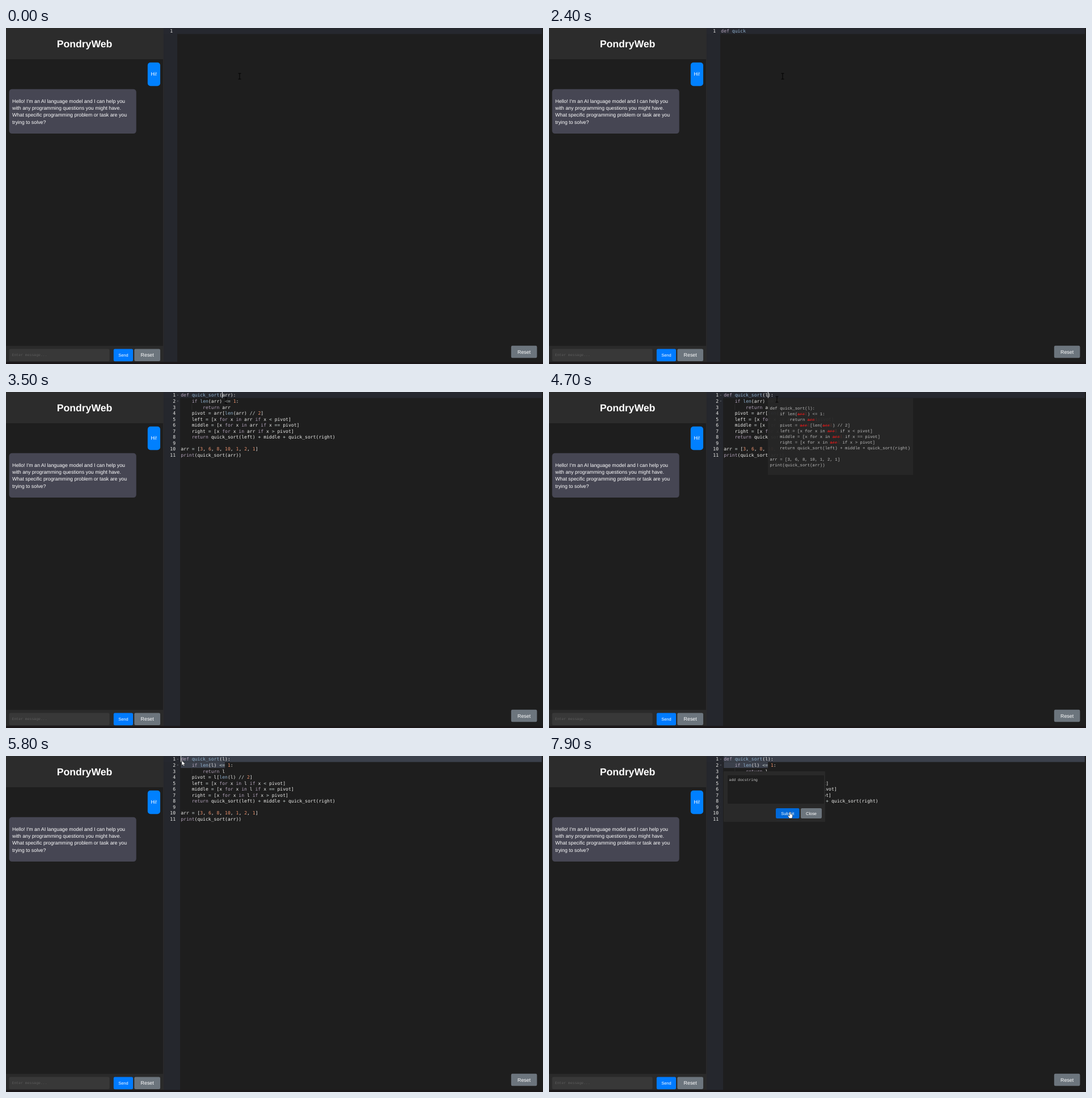
Recreate the animation shown at these times as an HTML page. Size 947 by 592 pixels, loop 8000 ms.

```html
<!DOCTYPE html>
<html lang="en">
<head>
<meta charset="utf-8">
<title>PondryWeb</title>
<style>
  html, body { margin: 0; width: 100%; height: 100%; overflow: hidden; background: #1e1e1e; }
  svg { display: block; width: 100%; height: 100%; }
  text { white-space: pre; text-rendering: geometricPrecision; fill: #fff; }
  .ui { font-family: "Liberation Sans", Arial, sans-serif; }
  .code { font: 8.09px "DejaVu Sans Mono", monospace; fill: #ececea; }
  .hint { font: 7.37px "Liberation Mono", monospace; fill: #bcbcbc; }
  .field { font: 6.47px "Liberation Mono", monospace; }
  .key { fill: #b3a3bb; }
  .fn { fill: #8fb0cc; }
  .num { fill: #e8906c; }
  .op { fill: #cbd6d4; }
  .del { fill: #d81a1a; text-decoration: line-through; }
  .ins { fill: #5c332e; }
</style>
</head>
<body>
<svg viewBox="0 0 947 592" preserveAspectRatio="none">
  <rect width="947" height="592" fill="#1e1e1e"/>
  <g id="editor"></g>
  <g id="chrome"></g>
  <g id="overlay"></g>
</svg>
<script>
const LOOP = 8000, STEP = 100;
const ROW = 10.55, CHAR = 4.87;
const $ = id => document.getElementById(id);

const rect = (x, y, w, h, fill, r = 0, more = '') =>
  `<rect x="${x}" y="${y}" width="${w}" height="${h}" rx="${r}" fill="${fill}" ${more}/>`;
const text = (x, y, body, cls, more = '') =>
  `<text x="${x}" y="${y}" class="${cls}" ${more}>${body}</text>`;
const esc = s => s.replace(/&/g, '&amp;').replace(/</g, '&lt;').replace(/>/g, '&gt;');
const span = (cls, s) => `<tspan class="${cls}">${esc(s)}</tspan>`;
const button = (x, y, w, h, fill, label, size) =>
  rect(x, y, w, h, fill, 2.2) +
  text(x + w / 2, y + h / 2 + size * 0.35, label, 'ui', `font-size="${size}" text-anchor="middle"`);

// Sorting program; v is the parameter's name, head the one in the signature
const program = (v, head = v) => [
  `def quick_sort(${head}):`,
  `    if len(${v}) <= 1:`,
  `        return ${v}`,
  `    pivot = ${v}[len(${v}) // 2]`,
  `    left = [x for x in ${v} if x < pivot]`,
  `    middle = [x for x in ${v} if x == pivot]`,
  `    right = [x for x in ${v} if x > pivot]`,
  '    return quick_sort(left) + middle + quick_sort(right)',
  '',
  'arr = [3, 6, 8, 10, 1, 2, 1]',
  'print(quick_sort(arr))'
];

const TOKENS = /((?<=def )\w+|\blen\b)|\b(def|if|return|for|in|print)\b|\b(\d+)\b|([<>=+\/]+)/g;
const paint = line => line.replace(TOKENS, (m, fn, key, num) =>
  span(fn ? 'fn' : key ? 'key' : num ? 'num' : 'op', m));

function drawChrome() {
  const says = [
    "Hello! I'm an AI language model and I can help you",
    'with any programming questions you might have.',
    'What specific programming problem or task are you',
    'trying to solve?'
  ];
  $('chrome').innerHTML =
    rect(0, 0, 277, 55, '#2c2c2c') +
    text(138.5, 33.5, 'PondryWeb', 'ui', 'font-size="17.65" font-weight="700" text-anchor="middle"') +
    rect(249.8, 60.7, 22.2, 41.5, '#0080ff', 5) +
    text(255.5, 84.4, 'Hi!', 'ui', 'font-size="8.84"') +
    rect(5.5, 107.8, 224.2, 78.3, '#464653', 5) +
    says.map((s, i) => text(11, 131.5 + i * 12.45, s, 'ui', 'font-size="8.84"')).join('') +
    rect(0, 560, 277, 28.5, '#2a2a2a') +
    rect(5.5, 565.5, 177, 21.5, '#383838', 2.5) +
    text(10.5, 578, 'Enter message...', 'field', 'style="fill:#5c5c5c"') +
    button(189.8, 565.5, 34.2, 21.7, '#007bff', 'Send', 7.4) +
    button(226.3, 565.5, 45.7, 21.5, '#6c757d', 'Reset', 8.84) +
    button(890.8, 559.8, 45.6, 21.4, '#6c757d', 'Reset', 8.84) +
    rect(277, 0, 1.5, 588.5, '#2b2b2e') +
    rect(0, 588.5, 947, 3.5, '#1b1719');
}

// Count of key presses made by time t
const pressed = (times, t) => times.filter(k => k <= t).length;
const NAME_KEYS = [400, 500, 600, 900, 1100, 1300, 1500, 1700, 1900];
const NOTE_KEYS = [6200, 6300, 6400, 6500, 6600, 6700, 6800, 7000, 7100, 7200, 7300, 7400, 7400];

// Pointer path: time, x, y
const PATH = [
  [3000, 412, 85], [3400, 388, 15], [3500, 388, 15], [3800, 402, 13],
  [5000, 402, 13], [5200, 386, 17], [5300, 336, 17], [5500, 310, 8],
  [5800, 310, 8], [6000, 325, 9], [7500, 325, 9], [7900, 425, 98]
];
function pointerAt(t) {
  const i = PATH.findIndex(p => p[0] > t);
  if (i === 0) return PATH[0].slice(1);
  if (i < 0) return PATH[PATH.length - 1].slice(1);
  const [a, b] = [PATH[i - 1], PATH[i]];
  const u = (t - a[0]) / (b[0] - a[0]), e = u * u * (3 - 2 * u);
  return [a[1] + (b[1] - a[1]) * e, a[2] + (b[2] - a[2]) * e];
}

// Everything the editor shows at time t; caret is [row, column]
function stateAt(t) {
  if (t < 3000) {
    const n = pressed(NAME_KEYS, t);
    return { lines: ['def quick'.slice(0, n)], caret: t >= 100 && t < 2200 ? [0, n] : null, row: 0 };
  }
  if (t < 3400) return { lines: program('arr'), caret: [10, 22], row: 10 };
  if (t < 4000) {
    const end = 15 + Math.max(0, Math.min(3, (t - 3500) / 100));
    return { lines: program('arr'), caret: [0, end], row: 0, sel: [[0, 15, end]] };
  }
  if (t < 5000) return { lines: program('arr', 'l'), caret: [0, 16], row: 0 };
  const lines = program('l');
  if (t < 5200) return { lines, caret: [0, 16], row: 0 };
  if (t < 5300) return { lines, caret: [1, 16], row: 1 };
  if (t < 5400) return { lines, caret: [1, 5], row: 1, sel: [[1, 5, 16]] };
  return { lines, caret: t < 6000 ? [0, 0] : null, row: 0, sel: [[0, 0, 130.7], [1, 0, 16]] };
}

function editorView(t) {
  const s = stateAt(t), full = s.lines.length > 1;
  const left = full ? 308.2 : 303.3, edge = full ? 307 : 302;
  const x = col => left + col * CHAR;
  let out = rect(278.5, 0, edge - 278.5, 588.5, '#25272d') +
    rect(278.5, s.row * ROW, 666.5, ROW, '#26282f');
  for (const [row, a, b] of s.sel || [])
    out += rect(x(a), row * ROW, (b - a) * CHAR, ROW, '#3b404b');
  if (full) {
    out += rect(x(4), 2 * ROW, 0.5, ROW, '#3a3a3a');
    out += [0, 1].map(i => `<path d="M301.6 ${i * ROW + 5}h2.6l-1.3 1.4z" fill="#6f747a"/>`).join('');
  }
  s.lines.forEach((line, i) => {
    const y = 8.4 + i * ROW;
    out += text(edge - 8, y, i + 1, 'code', `text-anchor="end" ${i === s.row ? 'font-weight="700"' : ''}`);
    out += text(left, y, paint(line), 'code');
  });
  if (s.caret) out += rect(x(s.caret[1]) - 0.3, s.caret[0] * ROW, 1.1, ROW, '#d4d6d8');
  return out;
}

function hintBox(x, lines) {
  return rect(x, 11, 256, 135, '#262626', 0, 'opacity=".95"') +
    lines.map((l, i) => text(x + 3.5, 31.2 + i * 10, l, 'hint')).join('');
}

function hintView(t) {
  if (t >= 2500 && t < 3000) return hintBox(347.2, program('arr').map(esc));
  if (t < 4300 || t >= 5000) return '';
  const change = span('del', 'arr') + span('ins', 'l');
  return hintBox(386, program('@', 'l').map(l => esc(l).replace(/@/g, change)));
}

function dialogView(t) {
  if (t < 6100) return '';
  const n = pressed(NOTE_KEYS, t);
  return rect(308, 27, 179, 89, '#292929', 1) +
    rect(315, 34, 170, 50, '#1e1e1e', 1) +
    text(317.5, 44, 'add docstring'.slice(0, n), 'field', 'style="fill:#c8c8c8"') +
    (t < 7500 ? rect(317.3 + n * 3.885, 38, 0.8, 7.5, '#ddd') : '') +
    button(400, 92, 41.5, 18, t >= 7800 ? '#0069d9' : '#007bff', 'Submit', 7.4) +
    button(444, 92, 37, 18, '#6c757d', 'Close', 7.4);
}

const BEAM = '<path d="M-2.5 -5h5M-2.5 5h5M0 -5V5" stroke="#000" stroke-width="1" fill="none"/>';
const ARROW = '<path d="M0 0V8.6L2 6.8L3.3 9.8L4.8 9.1L3.5 6.3H6.2z" fill="#fff" stroke="#111" stroke-width=".5"/>';
const HAND = '<path d="M-1 1Q0 -.6 1 1V4.5Q3.6 4.2 4.5 5.4V8.3Q4.3 9.6 3.5 11.8H-1.3L-3.7 7.6Q-4 6 -2.3 6.6L-1 8z" fill="#fff" stroke="#111" stroke-width=".5"/>';

function pointerView(t) {
  const [x, y] = pointerAt(t);
  const shape = t < 5800 ? BEAM : t < 7800 ? ARROW : HAND;
  return `<g transform="translate(${x} ${y})">${shape}</g>`;
}

let shown = -1;
function frame() {
  const t = Math.floor(performance.now() % LOOP / STEP) * STEP;
  if (t !== shown) {
    shown = t;
    $('editor').innerHTML = editorView(t);
    $('overlay').innerHTML = hintView(t) + dialogView(t) + pointerView(t);
  }
  requestAnimationFrame(frame);
}

drawChrome();
frame();
</script>
</body>
</html>
```
